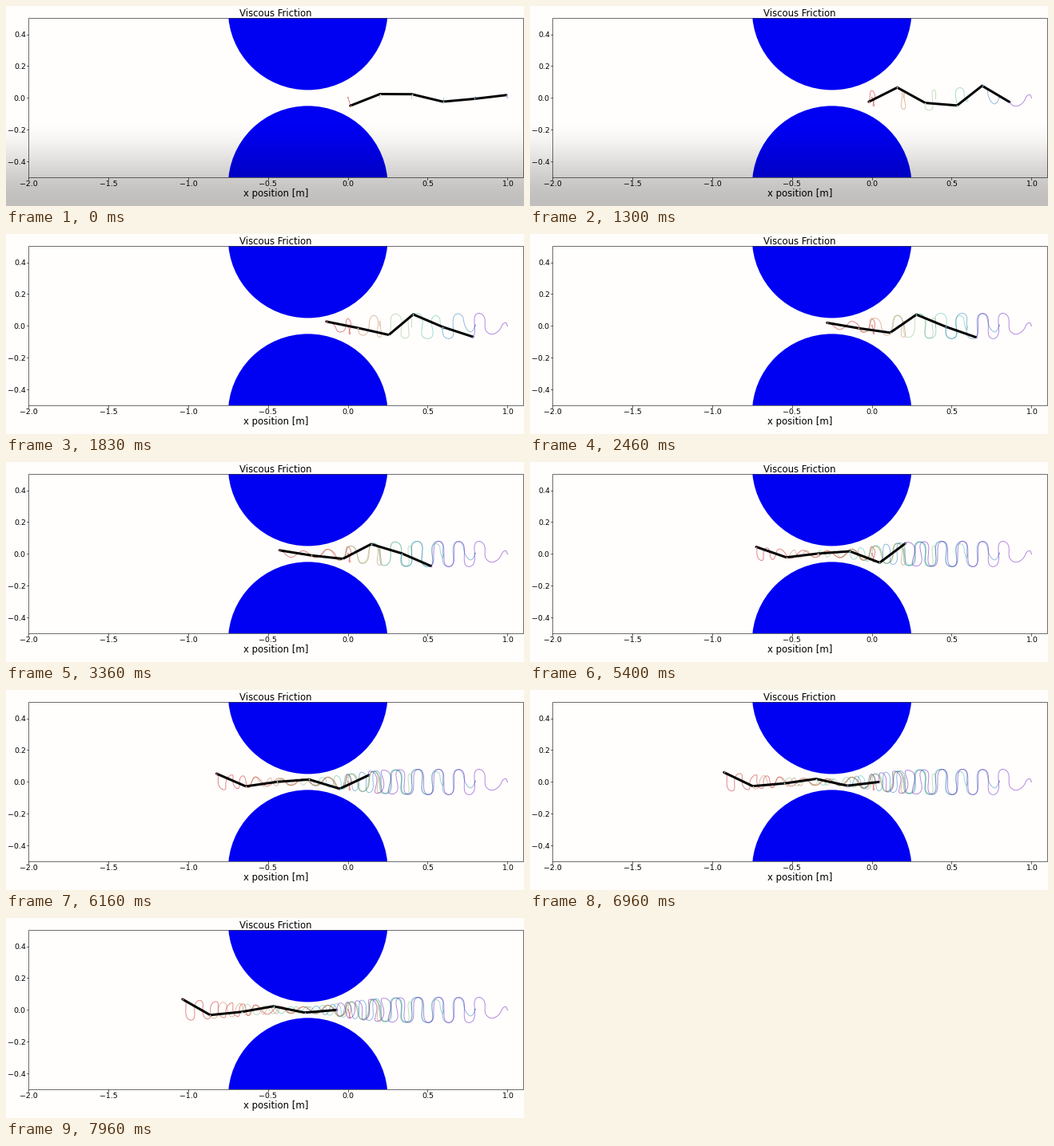
Animation, 648 px wide and 251 px high, one loop 8 s. Source, as a matplotlib script:

```python
import numpy as np
import matplotlib.pyplot as plt
from matplotlib.animation import FuncAnimation
from matplotlib.patches import Circle, Rectangle

W, H, DPI = 648, 251, 64
PT = 72 / DPI                  # points per pixel
SCALE = 199.7                  # pixels per metre
X0, Y0 = 427.6, 115.4          # pixel position of the data origin
LEFT, RIGHT, TOP, BOTTOM = 28, 647, 15, 215
STEP, LOOP = 40, 8000
LINK = 0.2 * SCALE
JOINTS = np.arange(6)
START = -0.9                   # gait cycle at which the body is still straight

plt.rcParams["font.family"] = "DejaVu Sans"

# Moments of rest: time, pause (ms), gait cycle, body centre (px), phase lag per joint
RESTS = [
    (0, 500, -0.55, 527.5, 0.29),
    (630, 270, -0.2, 524, 0.30),
    (1300, 60, 0.35, 512.9, 0.333),
    (2460, 100, 2.0, 465.8, 0.315),
    (4300, 30, 4.1, 406.9, 0.30),
    (5400, 30, 6.0, 378.5, 0.385),
    (6960, 40, 8.0, 338.5, 0.35),
    (7960, 40, 9.0, 315.5, 0.35),
]
TIME, PAUSE, CYCLE, CENTRE, LAG = np.array(RESTS).T
CLOCK = np.column_stack([TIME, TIME + PAUSE]).ravel()


def swing(x):
    """Wave amplitude in pixels: small in the gap, wide outside it."""
    m = (x - X0) / SCALE + 0.3
    width = np.where(m > 0, 0.36, 0.6)
    return SCALE * (0.02 + 0.06 * (1 - np.exp(-(m / width) ** 2)))


def body(c):
    """Pixel positions of the six joints for an array of gait cycles."""
    c = np.atleast_1d(c)[:, None]
    centre = np.interp(c, CYCLE, CENTRE)
    lag = np.interp(c, CYCLE, LAG)
    growth = np.clip((c - START) / (0.3 + 0.25 * JOINTS), 0, 1)
    size = growth * swing(centre + 39 * (JOINTS - 2.5))
    up = size * np.cos(2 * np.pi * (c - lag * JOINTS))
    reach = np.sqrt(LINK ** 2 - np.diff(up, axis=1) ** 2)
    x = np.cumsum(np.hstack([np.zeros_like(c), reach]), axis=1)
    return x + centre - x.mean(axis=1, keepdims=True), Y0 - up


GRID = np.linspace(START, CYCLE[-1], 800)
PATH_X, PATH_Y = body(GRID)


# --- static scene ---

fig = plt.figure(figsize=(W / DPI, H / DPI), dpi=DPI, facecolor="#fffefd")
ax = fig.add_axes([0, 0, 1, 1])
ax.axis("off")


def label(x, y, text, size, ha="center"):
    ax.text(x, y, text.replace("-", "\u2212"), fontsize=size * PT, ha=ha,
            va="baseline", zorder=6)


def tick(xs, ys):
    ax.plot(xs, ys, color="#222222", lw=0.7 * PT, zorder=5)


def plot_area(**style):
    return Rectangle((LEFT, TOP), RIGHT - LEFT, BOTTOM - TOP, **style)


ax.add_patch(plot_area(fill=False, ec="#333333", lw=0.7 * PT, zorder=5))

for side in (-1, 1):
    disc = Circle((X0 - 0.25 * SCALE, Y0 + side * 0.55 * SCALE),
                  0.5 * SCALE, fc="#0000f2", lw=0, zorder=1)
    ax.add_patch(disc)
    disc.set_clip_path(plot_area(transform=ax.transData))

for v in np.arange(-2, 1.01, 0.5):
    px = X0 + v * SCALE
    tick([px, px], [BOTTOM, BOTTOM + 2.5])
    label(px, 225.6, f"{v:.1f}", 9.32)

for k in range(-2, 3):
    py = Y0 - 0.2 * k * SCALE
    tick([LEFT - 2.3, LEFT], [py, py])
    label(24.8, py + 3.5, f"{0.2 * k:.1f}", 9.32, "right")

label(337.5, 13.2, "Viscous Friction", 11.65)
label(337.5, 239, "x position [m]", 11.65)

# Dark veil over the lower part that fades away
ramp = np.clip((np.arange(H) + 0.5 - 140) / 110, 0, 1)
veil = np.zeros((H, 1, 4))
veil[:, 0, 3] = 0.25 * ramp ** 2 * (3 - 2 * ramp)
shade = ax.imshow(veil, extent=(0, W, H, 0), aspect="auto",
                  interpolation="nearest", zorder=10)
ax.set_xlim(0, W)
ax.set_ylim(H, 0)


# --- moving parts ---

COLORS = plt.cm.rainbow(np.linspace(1, 0, 6))[:, :3]
trails = [ax.plot([], [], color=0.75 * col, alpha=0.5, lw=0.9 * PT, zorder=2)[0]
          for col in COLORS]
snake, = ax.plot([], [], color="black", lw=3 * PT, solid_joinstyle="round",
                 solid_capstyle="round", zorder=3)
pins = [ax.plot([], [], "o", ms=1.9 * PT, mew=0, color=0.4 * col + 0.5, zorder=4)[0]
        for col in COLORS]


def draw(i):
    t = (i + 0.5) * STEP
    c = np.interp(t, CLOCK, np.repeat(CYCLE, 2))
    x, y = (p[0] for p in body(c))
    n = np.searchsorted(GRID, c)
    for j in JOINTS:
        trails[j].set_data(np.append(PATH_X[:n, j], x[j]),
                           np.append(PATH_Y[:n, j], y[j]))
        pins[j].set_data([x[j]], [y[j]])
    snake.set_data(x, y)
    shade.set_alpha(np.interp(t, [1360, 1680], [1, 0]))
    return [*trails, snake, *pins, shade]


anim = FuncAnimation(fig, draw, frames=LOOP // STEP, interval=STEP,
                     repeat=True, repeat_delay=0, blit=False)
plt.show()
```
